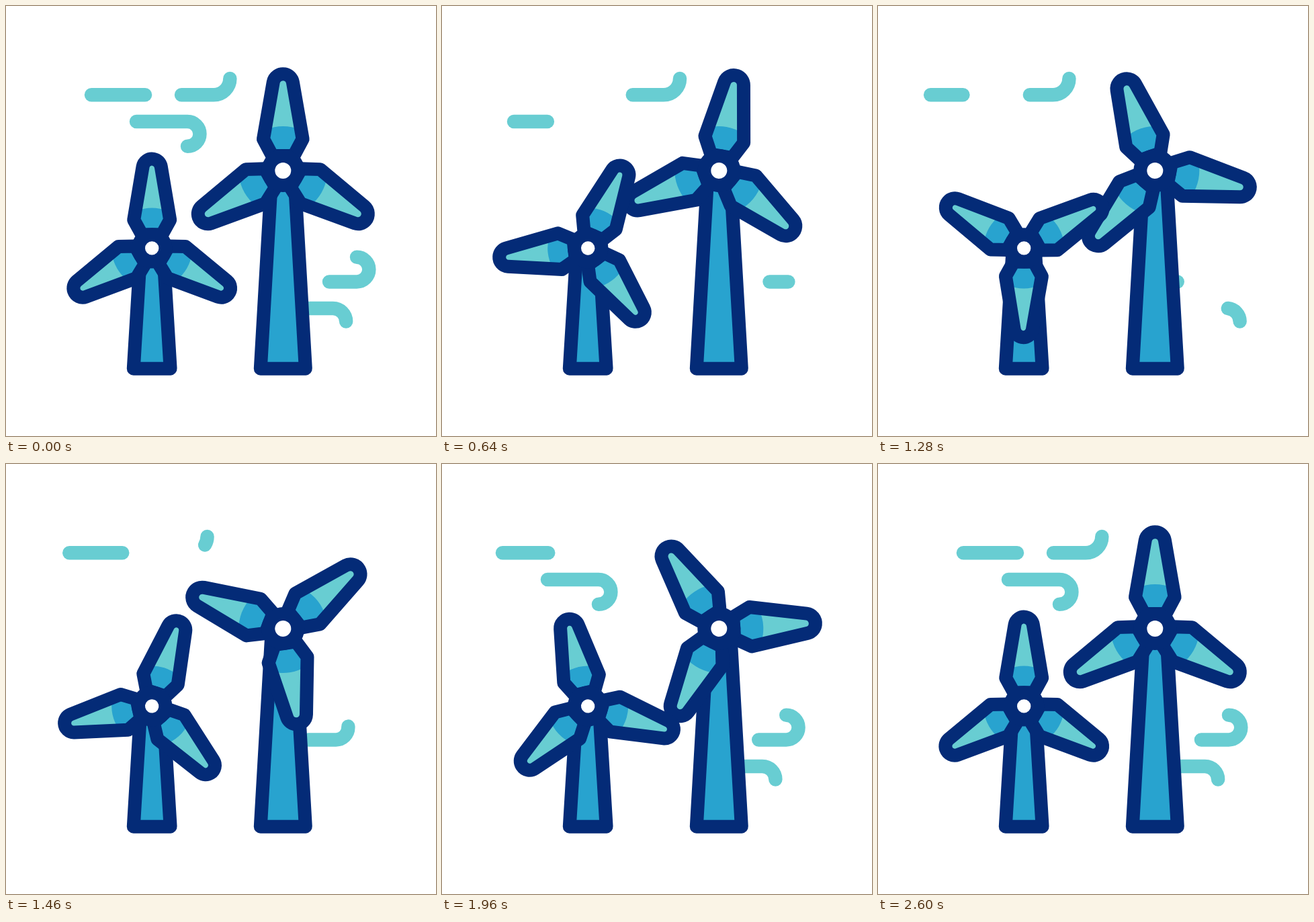
An HTML page with a canvas for the animation above (3.02 s loop, 640 px wide and 640 px high).

```html
<!DOCTYPE html>
<html lang="en">
<head>
<meta charset="utf-8">
<title>Wind turbines</title>
<style>
  html, body { margin: 0; width: 100%; height: 100%; overflow: hidden; background: #fff; }
  canvas { display: block; width: 640px; height: 640px; }
</style>
</head>
<body>
<canvas id="stage" width="640" height="640"></canvas>
<script>
const ctx = document.getElementById('stage').getContext('2d');
const NAVY = '#042b77', BLUE = '#28a3cf', TEAL = '#68cdd2';
const LOOP = 3020, MOVE = 2600, SPIN = 2400, TRIM = 360;

const clamp = v => Math.min(1, Math.max(0, v));
const smooth = v => { v = clamp(v); return v * v * (3 - 2 * v); };

// Cubic bezier (0.723, 0, 0.366, 1), solved for progress by bisection.
function spinEase(x) {
  x = clamp(x);
  let lo = 0, hi = 1;
  for (let i = 0; i < 30; i++) {
    const s = (lo + hi) / 2, r = 1 - s;
    if (3 * r * r * s * 0.723 + 3 * r * s * s * 0.366 + s * s * s < x) lo = s; else hi = s;
  }
  return lo * lo * (3 - 2 * lo);
}

// Horizontal drift of each group for its leaving, passing and arriving gusts.
const settle = (t, from, power) => -from * Math.pow(Math.max(0, MOVE - t) / 960, power);
const leftDrift = [
  t => 0.0323 * t,
  t => -71 + 0.0595 * (t - 960) + 0.0000295 * (t - 960) ** 2,
  t => settle(t, 71, 1.6)
];
const rightDrift = [
  t => 0.032 * t,
  t => 19.5 + 0.0405 * (t - 960),
  t => settle(t, 22, 2)
];

// A gust is a straight run followed by an arc; sweep > 0 turns downwards.
// times: leaving fades, passing grows, passing fades, arriving grows, arriving duration.
const gusts = [
  { x: 127, y: 132.3, run: 80, r: 0, sweep: 0, drift: leftDrift, times: [240, 1076, 1436, 1779, 240] },
  { x: 261, y: 132.3, run: 48, r: 24.3, sweep: -90, drift: leftDrift, times: [608, 819, 1190, 2000, TRIM] },
  { x: 194, y: 172, run: 76, r: 18.4, sweep: 180, drift: leftDrift, times: [60, 492, 837, 1523, TRIM] },
  { x: 481, y: 410.4, run: 41, r: 18.3, sweep: -180, drift: rightDrift, times: [100, 515, 821, 1226, TRIM] },
  { x: 442, y: 450, run: 44.5, r: 19.6, sweep: 90, drift: rightDrift, times: [180, 773, 1073, 1560, TRIM] }
];

function strokeGust(g, shift, from, to) {
  if (to <= 0.0005 || from >= 0.9995 || to <= from) return;
  const turn = g.sweep * Math.PI / 180, side = Math.sign(turn);
  const length = g.run + g.r * Math.abs(turn);
  const x = g.x + shift, endX = x + g.run;
  ctx.beginPath();
  ctx.moveTo(x, g.y);
  ctx.lineTo(endX, g.y);
  if (g.r) {
    const start = -side * Math.PI / 2;
    ctx.arc(endX, g.y + side * g.r, g.r, start, start + turn, side < 0);
  }
  ctx.setLineDash([(to - from) * length, 2 * length]);
  ctx.lineDashOffset = -from * length;
  ctx.stroke();
}

function drawWind(t) {
  ctx.strokeStyle = TEAL;
  ctx.lineWidth = 20.5;
  for (const g of gusts) {
    const [leave, grow, fade, arrive, span] = g.times;
    const [out, through, back] = g.drift.map(f => f(t));
    strokeGust(g, out, smooth((t - leave) / TRIM), 1);
    strokeGust(g, through, smooth((t - fade) / TRIM), smooth((t - grow) / TRIM));
    strokeGust(g, back, 0, smooth((t - arrive) / span));
  }
  ctx.setLineDash([]);
}

const turbines = [
  { x: 412.3, y: 245, foot: 33.5, top: 16.5, hub: 22, tip: 129, cap: 14.8,
    wide: 29.3, shoulder: 47, root: 16, band: 66, delay: 200 },
  { x: 217.2, y: 360.4, foot: 27.4, top: 16.5, hub: 20.2, tip: 119, cap: 13.8,
    wide: 27, shoulder: 42, root: 15, band: 60, delay: 0 }
];

function outline(fill) {
  ctx.fillStyle = fill;
  ctx.fill();
  ctx.stroke();
}

function bladePath(m) {
  const lean = Math.asin((m.wide - m.cap) / (m.tip - m.shoulder));
  const path = new Path2D();
  path.moveTo(-m.root, -m.hub);
  path.lineTo(-m.wide, -m.shoulder);
  path.arc(0, -m.tip, m.cap, Math.PI + lean, -lean);
  path.lineTo(m.wide, -m.shoulder);
  path.lineTo(m.root, -m.hub);
  path.closePath();
  return path;
}

function drawBlade(m) {
  const path = bladePath(m);
  ctx.fillStyle = TEAL;
  ctx.fill(path);
  ctx.save();
  ctx.clip(path);
  ctx.beginPath();
  ctx.arc(0, 0, m.band, 0, 2 * Math.PI);
  ctx.fillStyle = BLUE;
  ctx.fill();
  ctx.restore();
  ctx.stroke(path);
}

function drawTurbine(m, t) {
  ctx.save();
  ctx.translate(m.x, m.y);
  ctx.strokeStyle = NAVY;
  ctx.lineWidth = 20;

  const ground = 539.7 - m.y;
  ctx.beginPath();
  ctx.moveTo(-m.foot, ground);
  ctx.lineTo(-m.top, 0);
  ctx.lineTo(m.top, 0);
  ctx.lineTo(m.foot, ground);
  ctx.closePath();
  outline(BLUE);

  ctx.rotate(2 * Math.PI * spinEase((t - m.delay) / SPIN));
  for (let i = 0; i < 3; i++) {
    drawBlade(m);
    ctx.rotate(2 * Math.PI / 3);
  }
  ctx.beginPath();
  ctx.arc(0, 0, m.hub, 0, 2 * Math.PI);
  outline('#fff');
  ctx.restore();
}

function draw(t) {
  ctx.fillStyle = '#fff';
  ctx.fillRect(0, 0, 640, 640);
  drawWind(t);
  for (const m of turbines) drawTurbine(m, t);
}

ctx.lineCap = ctx.lineJoin = 'round';
const began = performance.now();
function tick() {
  draw((performance.now() - began) % LOOP);
  requestAnimationFrame(tick);
}
draw(0);
requestAnimationFrame(tick);
</script>
</body>
</html>
```
